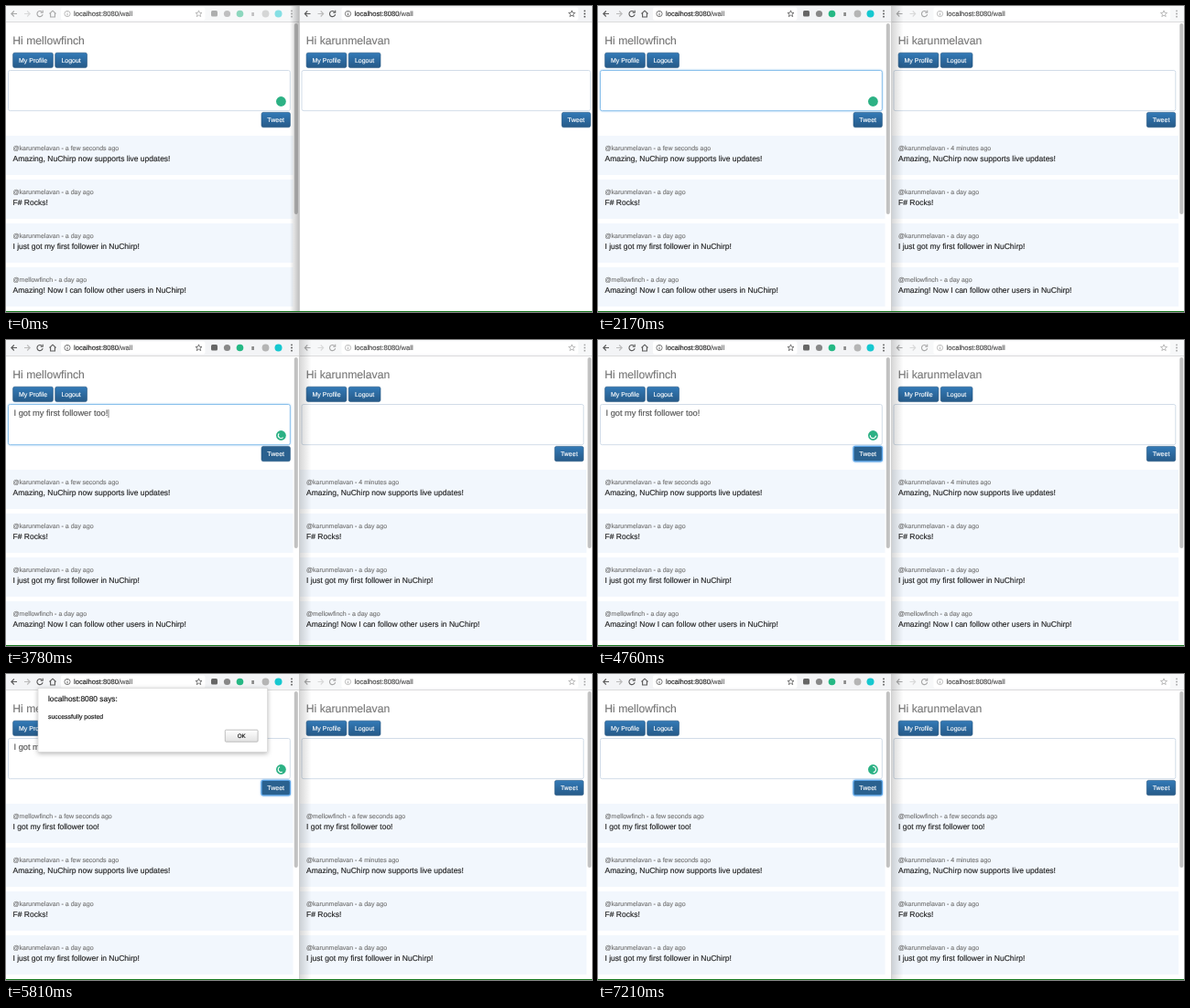
Write an HTML page that moves like this. It is 640 px wide and 335 px high and loops after 7.28 s.

```html
<!DOCTYPE html>
<html lang="en">
<head>
<meta charset="utf-8">
<title>Live wall</title>
<style>
html, body { margin: 0; width: 100%; height: 100%; overflow: hidden; background: #fff; }
svg { display: block; width: 640px; height: 335px; font-family: "Liberation Sans", Arial, sans-serif; }
text { fill: currentColor; stroke: currentColor; stroke-width: .15; text-rendering: geometricPrecision; }
.hide { display: none; }
.icons { fill: none; stroke: #5a5a5a; stroke-width: 1.1; }
.idle .icons { opacity: .5; }
.url { font-size: 7.6px; color: #222; }
.url tspan { fill: #555; stroke: #555; }
.idle .url { color: #444; }
.bar { fill: #f3f4f6; }
.idle .bar { fill: #f7f8f9; }
.title { font-size: 12.2px; color: #777; }
.btn rect { fill: url(#blue); stroke: #245580; stroke-width: .6; }
.btn text { font-size: 7px; color: #fff; text-anchor: middle; }
.btn.hover rect, .btn.focus rect { fill: #2a618f; }
.btn.focus rect { stroke: #5ca4e6; stroke-width: 1.2; filter: drop-shadow(0 0 .8px #8cc0f2); }
.field { fill: #fff; stroke: #ccd9e6; stroke-width: .9; }
.field.focus { stroke: #7fbaea; filter: drop-shadow(0 0 1.2px #a5d0f4); }
.card { fill: #f2f7fd; }
.meta { font-size: 7px; color: #777; }
.post { font-size: 8.5px; color: #222; }
.draft { font-size: 9.25px; color: #555; }
.thumb { fill: #c1c1c1; }
#dialog { color: #111; }
#ok rect { fill: url(#grey); stroke: #b0b0b0; stroke-width: .8; }
#ok text { font-size: 6.3px; text-anchor: middle; }
#ok.press rect { stroke: #777; }
#ok.press text { font-weight: bold; }
</style>
</head>
<body>
<svg id="stage" viewBox="0 0 640 335">
  <defs>
    <linearGradient id="blue" x2="0" y2="1"><stop stop-color="#337ab7"/><stop offset="1" stop-color="#265a88"/></linearGradient>
    <linearGradient id="grey" x2="0" y2="1"><stop stop-color="#fff"/><stop offset="1" stop-color="#e2e2e2"/></linearGradient>
    <linearGradient id="toRight"><stop stop-color="#000" stop-opacity=".16"/><stop offset="1" stop-color="#000" stop-opacity="0"/></linearGradient>
    <linearGradient id="toLeft"><stop stop-color="#000" stop-opacity="0"/><stop offset="1" stop-color="#000" stop-opacity=".26"/></linearGradient>
    <filter id="drop" x="-10%" y="-20%" width="120%" height="150%"><feDropShadow dx="0" dy="1.5" stdDeviation="2.5" flood-opacity=".3"/></filter>
  </defs>
</svg>
<script>
const LOOP = 7280, STEP = 70;
const DRAFT = "I got my first follower too!";
const LEFT = "mellowfinch", RIGHT = "karunmelavan", APP = "NuChirp";
const AT = {
  loaded: 700, leftFocus: 1610, typeStart: 2240, typeEnd: 3710,
  hover: 3780, click: 4480, posted: 4830, press: 6440, closed: 6650
};

const rect = (x, y, w, h, attrs = "") => `<rect x="${x}" y="${y}" width="${w}" height="${h}" ${attrs}/>`;
const text = (x, y, cls, str) => `<text x="${x}" y="${y}" class="${cls}">${str}</text>`;
const dot = (x, y, r, fill) => `<circle cx="${x}" cy="${y}" r="${r}" fill="${fill}" stroke="none"/>`;
const button = (x, y, w, label, id = "") =>
  `<g class="btn" id="${id}">${rect(x, y, w, 16.4, 'rx="2"')}<text x="${x + w / 2}" y="${y + 10.7}">${label}</text></g>`;

function feed(id, firstAge, posted) {
  const posts = [
    [RIGHT, firstAge, `Amazing, ${APP} now supports live updates!`],
    [RIGHT, "a day ago", "F# Rocks!"],
    [RIGHT, "a day ago", `I just got my first follower in ${APP}!`],
    [LEFT, "a day ago", `Amazing! Now I can follow other users in ${APP}!`]
  ];
  if (posted) posts.unshift([LEFT, "a few seconds ago", DRAFT]);
  const cards = posts.slice(0, 4).map(([user, age, body], i) => {
    const y = 142 + i * 48;
    return rect(0, y, 313.5, 43, 'class="card"') +
      text(7.5, y + 16.3, "meta", `@${user} - ${age}`) + text(7.5, y + 28, "post", body);
  });
  return `<g id="${id}">${cards.join("")}</g>`;
}

function toolbar(urlX, starX, menuX, extras = "") {
  const info = urlX - 7, reload = urlX - (extras ? 37 : 24);
  const points = Array.from({ length: 10 }, (_, i) => {
    const a = i * Math.PI / 5 - Math.PI / 2, r = i % 2 ? 1.6 : 3.7;
    return `${(starX + r * Math.cos(a)).toFixed(1)},${(8.6 + r * Math.sin(a)).toFixed(1)}`;
  });
  return rect(0, 0, 320, 17.5, 'class="bar"') + rect(0, 17, 320, .7, 'fill="#cfcfcf"') +
    rect(info - 7, 1.5, starX - info + 14, 14, 'rx="2" fill="#fff"') +
    `<g class="icons">
      <path d="M12 8.5H6M8.8 5.5L5.8 8.5L8.8 11.5"/>
      <path d="M20 8.5h6M23.2 5.5l3 3l-3 3" stroke="#bbb"/>
      <path d="M${reload + 2.2} 6.3A3.1 3.1 0 1 0 ${reload + 3.1} 9.2M${reload + 3.2} 4.7v2.5h-2.5"/>
      <circle cx="${info}" cy="8.5" r="3.1" stroke-width=".8"/><path d="M${info} 8v2.4M${info} 6.4v.8" stroke-width=".9"/>
      <polygon points="${points.join(" ")}" stroke-width=".8"/>
      ${[5.3, 8.5, 11.7].map(y => dot(menuX, y, .9, "#555")).join("")}${extras}
    </g>` + text(urlX, 11.2, "url", "localhost:8080<tspan>/wall</tspan>");
}

const extras = `<path d="M47.5 8.5L51 5.2L54.5 8.5M48.6 8v4h4.8v-4"/>` +
  rect(224, 5, 7, 6.5, 'rx="1.5" fill="#666" stroke="none"') +
  dot(241.5, 8.5, 3.6, "#888") + dot(255.5, 8.5, 3.8, "#25b884") +
  rect(268.3, 7, 2.6, 4, 'fill="#888" stroke="none"') +
  dot(283.5, 8.5, 3.9, "#b5b5b5") + dot(297.5, 8.5, 4, "#16c8d0");

const heading = user => text(7.3, 42, "title", `Hi ${user}`) +
  button(7.6, 51.2, 43.8, "My Profile") + button(53.7, 51.2, 34.8, "Logout");

const thumb = id => rect(314.8, 19, 4, 209, `rx="2" class="thumb" id="${id}"`);

const dialog = `<g id="dialog">
  ${rect(35, 15.3, 250.5, 70, 'fill="#fff" stroke="#c8c8c8" stroke-width=".5" filter="url(#drop)"')}
  <text x="46" y="30.4" font-size="8.4">localhost:8080 says:</text>
  <text x="46" y="49.2" font-size="6.95">successfully posted</text>
  <g id="ok">${rect(239.3, 61.2, 35.8, 13, 'rx="1"')}<text x="257.2" y="70">OK</text></g></g>`;

document.getElementById("stage").innerHTML += `
  <g id="leftPane">${rect(0, 0, 320, 335, 'fill="#fff"')}${toolbar(74, 210.5, 312, extras)}${heading(LEFT)}
    ${rect(2.5, 70.5, 307.8, 44.2, 'rx="2" class="field" id="leftField"')}
    <text x="8.5" y="83.3" class="draft" id="draft"></text>
    ${rect(0, 76, .7, 9, 'id="caret" fill="#555"')}
    ${dot(300.4, 104.5, 5.4, "#2cb184")}
    <path id="spinner" d="M-3.1 0A3.1 3.1 0 0 0 3.1 0" fill="none" stroke="#fff" stroke-width="1.2"/>
    ${button(279, 116.4, 31.4, "Tweet", "send")}
    ${feed("leftOld", "a few seconds ago")}${feed("leftNew", "a few seconds ago", true)}${thumb("leftThumb")}${dialog}
  </g>
  <g id="rightPane" transform="translate(320.5)">${rect(0, 0, 320, 335, 'fill="#fff"')}${toolbar(60, 297.5, 311.5)}${heading(RIGHT)}
    ${rect(2.5, 70.5, 307.8, 44.2, 'rx="2" class="field" id="rightField"')}
    ${button(278.8, 116.4, 31.4, "Tweet", "rightSend")}
    ${feed("rightOld", "4 minutes ago")}${feed("rightNew", "4 minutes ago", true)}${thumb("rightThumb")}
  </g>
  ${rect(310, 0, 10.5, 335, 'id="shadeLeft" fill="url(#toLeft)"')}
  ${rect(320.5, 0, 13, 335, 'id="shadeRight" fill="url(#toRight)"')}
  ${rect(320, 0, .7, 335, 'fill="#c4c4c4"')}
  ${rect(0, 334, 640, 1, 'fill="#17791f"')}`;

const $ = id => document.getElementById(id);
const show = (id, on) => $(id).classList.toggle("hide", !on);
const mark = (id, cls, on) => $(id).classList.toggle(cls, on);

function draw(now) {
  const t = Math.floor(now % LOOP / STEP) * STEP;
  const loaded = t >= AT.loaded, posted = t >= AT.posted, closed = t >= AT.closed;
  const leftActive = t >= AT.leftFocus, clicked = t >= AT.click;

  mark("leftPane", "idle", !leftActive);
  mark("rightPane", "idle", leftActive);
  show("shadeLeft", !leftActive);
  show("shadeRight", leftActive);

  show("leftOld", !posted);
  show("leftNew", posted);
  show("rightOld", loaded && !posted);
  show("rightNew", posted);
  show("rightThumb", loaded);
  for (const id of ["leftThumb", "rightThumb"]) $(id).setAttribute("height", posted ? 193 : 209);
  $("rightField").setAttribute("width", loaded ? 307.8 : 315.3);
  $("rightSend").setAttribute("transform", `translate(${loaded ? 0 : 7.7})`);

  const progress = Math.min(1, Math.max(0, (t - AT.typeStart) / (AT.typeEnd - AT.typeStart)));
  const typed = closed ? "" : DRAFT.slice(0, Math.round(progress * DRAFT.length));
  $("draft").textContent = typed;
  show("caret", typed && !clicked);
  $("caret").setAttribute("x", 8.8 + (typed ? $("draft").getComputedTextLength() : 0));
  mark("leftField", "focus", leftActive && !clicked);
  mark("send", "hover", t >= AT.hover && !clicked);
  mark("send", "focus", clicked);

  show("spinner", t > AT.typeStart);
  const angle = 45 + (t - AT.hover) / 252 * 360;
  $("spinner").setAttribute("transform", `translate(300.4 104.5) rotate(${angle})`);

  show("dialog", posted && !closed);
  mark("ok", "press", t >= AT.press);
}

const start = performance.now();
function tick() {
  draw(performance.now() - start);
  requestAnimationFrame(tick);
}
tick();
</script>
</body>
</html>
```
